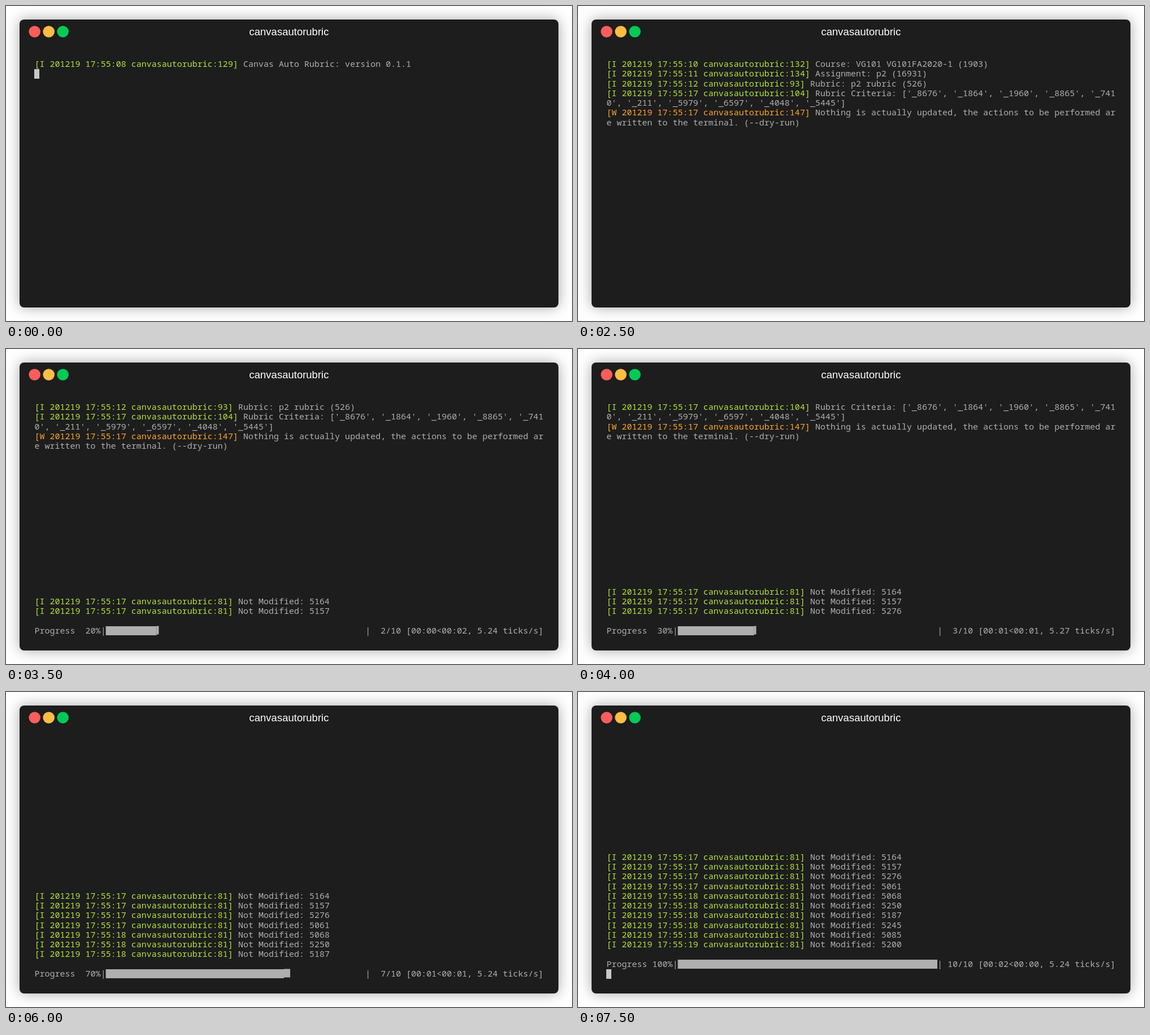
An HTML page that plays this animation: 1002 px wide and 559 px high, repeating every 8 s.

```html
<!DOCTYPE html>
<html lang="en">
<head>
<meta charset="utf-8">
<title>canvasautorubric</title>
<style>
  html, body { margin: 0; width: 100%; height: 100%; overflow: hidden; background: #fff; }
  #window {
    position: absolute; left: 24px; top: 24px; width: 954px; height: 511px;
    border-radius: 8px; background: #1d1d1d; box-shadow: 0 0 25px rgba(0, 0, 0, .35);
  }
  svg { position: absolute; left: 0; top: 0; }
  #title { font: 18.5px "Liberation Sans", Arial, sans-serif; fill: #fff; text-anchor: middle; }
  #screen { font: 15px "Noto Sans Mono", monospace; letter-spacing: .01px; fill: #afafaf; }
  #screen text { white-space: pre; }
  .I, .W { font-weight: 500; }
  .I { fill: #b3e33b; }
  .W { fill: #ffa727; }
</style>
</head>
<body>
<div id="window"></div>
<svg width="1002" height="559">
  <circle cx="50.7" cy="45.5" r="10.3" fill="#ff5c5c"/>
  <circle cx="75.7" cy="45.5" r="10.3" fill="#ffbd44"/>
  <circle cx="100.7" cy="45.5" r="10.3" fill="#00ca56"/>
  <text id="title" x="501" y="52">canvasautorubric</text>
  <g id="screen"></g>
</svg>
<script>
const STEP = 500, STEPS = 16;
const LEFT = 50.5, COL = 9.01, ROW = 17.25, BAR_COL = 14, BAR_CELLS = 51;
const screen = document.getElementById('screen');

const log = (level, sec, line, msg) =>
  `<tspan class="${level}">[${level} 201219 17:55:${sec} canvasautorubric:${line}]</tspan> ${msg}`;

const intro = [
  log('I', '08', 129, 'Canvas Auto Rubric: version 0.1.1'),
  log('I', '10', 132, 'Course: VG101 VG101FA2020-1 (1903)'),
  log('I', '11', 134, 'Assignment: p2 (16931)'),
  log('I', '12', 93, 'Rubric: p2 rubric (526)'),
  log('I', '17', 104, "Rubric Criteria: ['_8676', '_1864', '_1960', '_8865', '_741"),
  "0', '_211', '_5979', '_6597', '_4048', '_5445']",
  log('W', '17', 147, 'Nothing is actually updated, the actions to be performed ar'),
  'e written to the terminal. (--dry-run)'
];
const entries = [5164, 5157, 5276, 5061, 5068, 5250, 5187, 5245, 5085, 5200].map((id, i) =>
  log('I', i < 4 ? 17 : i < 9 ? 18 : 19, 81, 'Not Modified: ' + id));
const rates = [0, 5.12, 5.24, 5.27, 5.28, 5.28, 5.25, 5.24, 5.24, 5.24, 5.24];

const text = (row, str, col = 0) =>
  `<text x="${LEFT + col * COL}" y="${Math.round(108 + ROW * row)}">${str}</text>`;
const rect = (x, y, w, h, fill = '#afafaf') =>
  `<rect x="${x}" y="${y}" width="${w}" height="${h}" fill="${fill}"/>`;
const rowTop = row => Math.round(95 + ROW * row);
const cursor = row => rect(50, rowTop(row), 9, 17, '#c7c7c7');
const lines = (list, first) => list.map((str, i) => text(first + i, str)).join('');

function progress(row, n) {
  const clock = ticks => '00:0' + Math.round(ticks / rates[n]);
  const cells = BAR_CELLS * n / 10, full = Math.floor(cells);
  const eighths = Math.round((cells - full) * 8);
  const x = LEFT + BAR_COL * COL, y = rowTop(row);
  // Every partial block but the half comes from a wider fallback font.
  const part = eighths === 4 ? COL / 2 : eighths * 1.85;
  return text(row, `Progress ${String(n * 10).padStart(3)}%|`) +
    rect(x, y, full * COL, 16) +
    (part ? rect(x + full * COL, y - .5, part, 15) : '') +
    text(row, `| ${String(n).padStart(2)}/10 [${clock(n)}&lt;${clock(10 - n)}, ${rates[n].toFixed(2)} ticks/s]`,
      BAR_COL + BAR_CELLS);
}

function render(step) {
  if (step < 5) {
    const shown = step < 4 ? step + 1 : intro.length;
    return lines(intro.slice(0, shown), 0) + cursor(shown);
  }
  const n = step - 5, done = n === 10 ? 1 : 0;
  return lines(intro.slice(n + 1), 0) +
    lines(entries.slice(0, n), 22 - n - done) +
    (n ? progress(23 - done, n) : '') +
    (done ? cursor(23) : '');
}

const start = performance.now();
let last = -1;
function tick() {
  const step = Math.floor((performance.now() - start) / STEP) % STEPS;
  if (step !== last) screen.innerHTML = render(last = step);
  requestAnimationFrame(tick);
}
tick();
</script>
</body>
</html>
```
